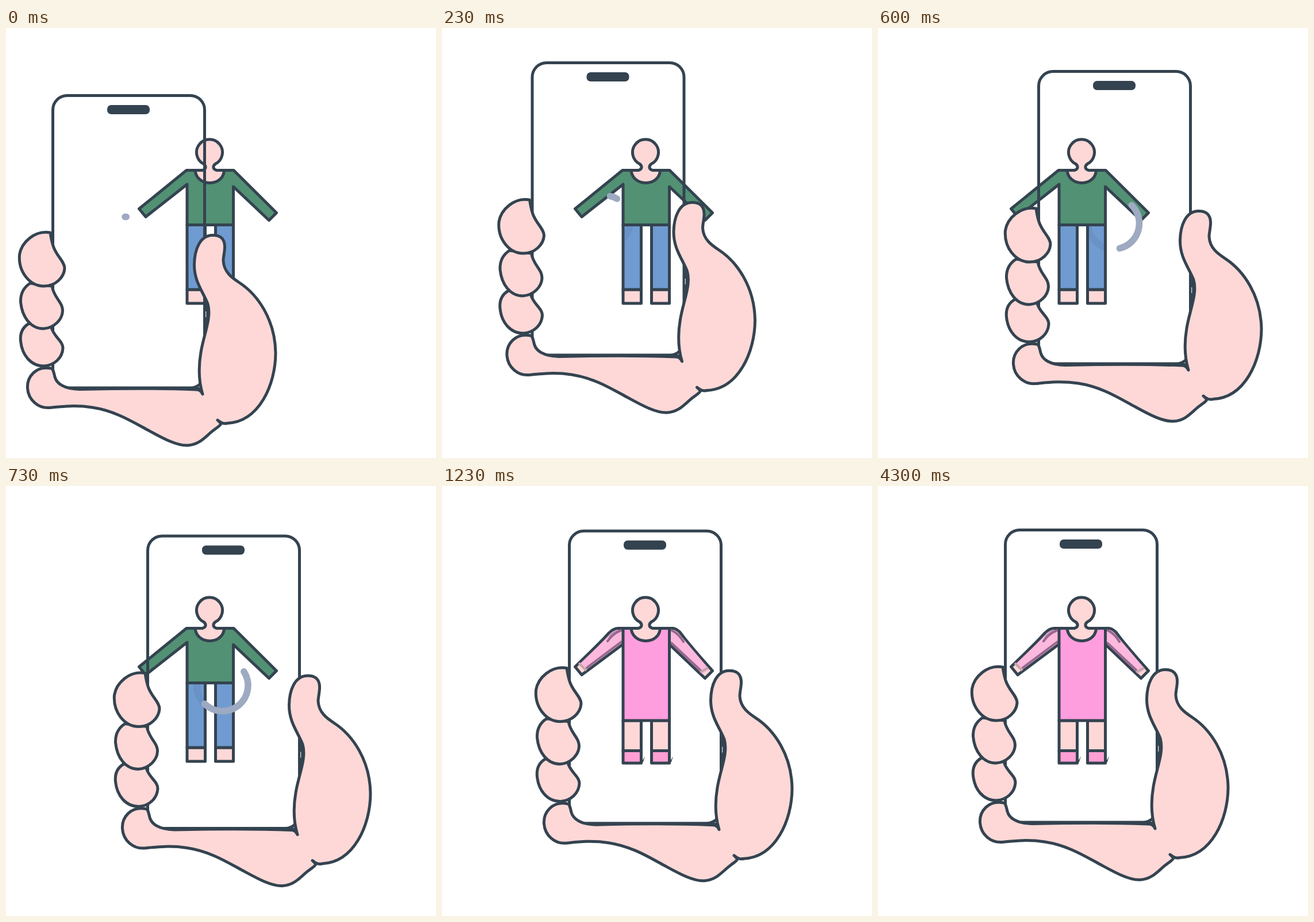
Recreate the animation shown at these times as an HTML page. Size 748x748 px, loop 5010 ms.

```html
<!DOCTYPE html>
<html lang="en">
<head>
<meta charset="utf-8">
<title>Phone fitting room</title>
<style>
  html, body { margin: 0; width: 100%; height: 100%; overflow: hidden; background: #fff; }
  svg { display: block; width: 100vw; height: 100vh; }
  .line { stroke: #344350; stroke-width: 5; stroke-linejoin: round; stroke-linecap: round; }
  .ink { fill: #344350; }
  .skin { fill: #fdd8d7; }
  .green { fill: #529174; }
  .blue { fill: #6f9bd1; }
  .dress { fill: #ff9edf; }
  .shoe { fill: #ff9fd3; }
  .sleeve { fill: #fdb8dd; }
  .shade { fill: #c58abb; }
  .seam { fill: none; stroke: #96688f; stroke-width: 4; stroke-linecap: round; stroke-linejoin: round; }
  .cuff { fill: none; stroke: #c4a6a8; stroke-width: 4; }
  .none { fill: none; }
</style>
</head>
<body>
<svg viewBox="0 0 748 748">
  <defs>
    <clipPath id="legs"><path d="M317 345H344V453H317ZM367 345H393V453H367Z"/></clipPath>
    <path id="head" class="line skin" d="M329 247.500H342C349 245 348 240 344 236.500A22.500 22.500 0 1 1 364 236.500C360 240 359 245 366 247.500H379.500C379 260 369 269.500 354.500 269.500C340 269.500 330 260 329 247.500Z"/>
  </defs>

  <g id="casual" class="line">
    <path class="skin" d="M315 455H346.500V479H315ZM364.500 455H395.500V479H364.500Z"/>
    <path class="blue" d="M315 342.500H346.500V455H315ZM364.500 342.500H395.500V455H364.500Z"/>
    <path class="green" d="M314 247.500L231.500 314.500L243 328.500L315 272V342.500H395.500V276L457.500 334.500L470.500 321.500L396 247.500Z"/>
    <use href="#head"/>
  </g>

  <g id="formal">
    <g class="line">
      <path class="skin" d="M315 408H346.500V460.500H315ZM364.500 408H395.500V460.500H364.500Z"/>
      <path class="shoe" d="M315 460.500H346.500V482H315ZM364.500 460.500H395.500V482H364.500Z"/>
      <path class="skin" d="M315 247.500H306Q298 248 290 256Q278 270 231.500 314.500L243 328.500L315 275Z"/>
      <path class="skin" d="M396 247.500H402Q410 249 416 257Q428 274 470.500 321.500L457.500 334.500L396 276Z"/>
    </g>
    <path class="ink" d="M345 484L353 470L350 480ZM394 484L402 470L399 480Z"/>
    <path class="sleeve" d="M313 250H306Q299 251 292 258Q280 271 238 311L249 321L313 273Z"/>
    <path class="sleeve" d="M398 250H402Q408 251 414 259L465 319L453 327L398 274Z"/>
    <path class="shade" d="M313 250H306Q299 251 291 260L287 272Q301 254 313 251Z"/>
    <path class="shade" d="M398 250H402Q409 252 416 262L422 273Q408 255 398 251Z"/>
    <path class="seam" d="M312 251Q298 256 288 270M312 271L252 316"/>
    <path class="seam" d="M399 251Q411 256 420 271M399 273L449 320"/>
    <path class="cuff" d="M238 308L251 321M463 316L449 324"/>
    <path class="line dress" d="M315 247.500H395.500V408H315Z"/>
    <use href="#head"/>
  </g>

  <g id="phone">
    <rect class="line none" x="221.500" y="76.500" width="264" height="508.500" rx="25"/>
    <rect class="ink" x="316" y="93" width="74" height="16" rx="7"/>
    <path class="ink" d="M484 424L492 440L494 460L484 508ZM430 584L478 584L483 597L470 590Z"/>
    <path d="M487.700 452V462" stroke="#fff"/>
    <g class="line skin">
      <path d="M218 551C192 546 176 566 177.500 586C179 606 196 621 216 619.500C232 618 258 614 290 619C330 625 360 644 386 658C410 671 436 686 456 685C478 684 488 668 502 658C508 653 513 651 514 647L508 641C514 646 518 648 525 646.500C580 644 609 580 609 524C608 466 578 423 546 402C534 394 519 384 518 364C518 356 521 347 520.500 338C520 326 513 319 499 319.500C477 320 468 345 467.500 370C467 400 483 418 491 439C498 463 484 492 479 523C474 552 476 576 482 596C479 590 476 588 470 588C400 585 330 586 268 587.500C240 587 228 577 225 566C223 558 222 551 218 551Z"/>
      <path d="M180 473C168 480 164 490 165.500 504C168 528 183 547 206 547C224 546 238 533 239 516C239 503 223 496 219 480Z"/>
      <path d="M182 403C168 412 165 424 165.500 436C168 462 183 482 205 482C224 481 238 466 238.500 451C239 436 223 428 220 408Z"/>
      <path d="M217 315C190 310 167 332 163.500 353C161 383 181 408 206 408C226 408 241 393 242 377C242 365 227 355 222 338C219 329 218 322 217 315Z"/>
    </g>
  </g>

  <g id="spinner" fill="none" stroke-width="11.500">
    <circle id="track" r="44.500" stroke="#465a83" stroke-opacity=".14" clip-path="url(#legs)"/>
    <path id="arc" stroke="#9daac1" stroke-linecap="round"/>
  </g>
</svg>
<script>
const LOOP = 5010, READY = 1000, RADIUS = 44.5;
const $ = id => document.getElementById(id);

// rows of [time, value]
const phoneX = [[0, -140], [130, -100], [230, -64.5], [330, -22], [430, 22.5], [530, 68], [600, 58], [730, 25], [900, 8], [1100, 2], [1230, 0]];
const phoneY = [[0, 41], [130, 6], [230, -16], [320, -21], [430, -13.5], [530, -7], [730, 10.5], [870, 18], [1000, 14], [1100, 7], [1230, 1.7], [1400, 0]];
const ringX = [[0, 207], [230, 283], [430, 373], [530, 419], [600, 410], [730, 376.5], [1000, 357]];
const ringY = [[0, 373], [230, 336], [330, 327], [430, 329], [730, 347], [1000, 350]];
const tail = [[0, 0], [230, 12], [430, 29], [730, 57], [1000, 86]];

// Smooth curve through the rows, flat at turning points
function curve(rows, t) {
  const last = rows.length - 1;
  if (t >= rows[last][0]) return rows[last][1];
  const i = rows.findIndex(r => r[0] > t) - 1;
  const rate = k => (rows[k + 1][1] - rows[k][1]) / (rows[k + 1][0] - rows[k][0]);
  const slope = k => {
    if (k === 0) return rate(0);
    if (k === last) return 0;
    const a = rate(k - 1), b = rate(k);
    return a * b > 0 ? 2 * a * b / (a + b) : 0;
  };
  const [t0, v0] = rows[i], [t1, v1] = rows[i + 1];
  const d = t1 - t0, u = (t - t0) / d, w = 1 - u;
  return w * w * ((1 + 2 * u) * v0 + u * d * slope(i))
       + u * u * ((3 - 2 * u) * v1 - w * d * slope(i + 1));
}

// The picture advances in alternating holds of 30 and 70 ms
function hold(t) {
  const base = Math.floor(t / 100) * 100;
  return t - base < 30 ? base : base + 30;
}

function arcPath(x, y, from, to) {
  const point = deg => {
    const a = (deg - 90) * Math.PI / 180;
    return `${x + RADIUS * Math.cos(a)} ${y + RADIUS * Math.sin(a)}`;
  };
  return `M${point(from)}A${RADIUS} ${RADIUS} 0 ${to - from > 180 ? 1 : 0} 1 ${point(to)}`;
}

function show(id, on) {
  $(id).style.display = on ? "" : "none";
}

function draw(now) {
  const t = hold(now % LOOP);
  const loading = t < READY;
  $("phone").setAttribute("transform", `translate(${curve(phoneX, t)} ${curve(phoneY, t)})`);
  show("casual", loading);
  show("formal", !loading);
  show("spinner", loading);
  if (loading) {
    const x = curve(ringX, t), y = curve(ringY, t);
    const head = 180 * (1 - Math.cos(Math.PI * t / 1260));
    $("track").setAttribute("cx", x);
    $("track").setAttribute("cy", y);
    $("arc").setAttribute("d", arcPath(x, y, curve(tail, t), Math.max(head, curve(tail, t) + 3)));
  }
}

const start = performance.now();
function tick() {
  draw(performance.now() - start);
  requestAnimationFrame(tick);
}
tick();
</script>
</body>
</html>
```
